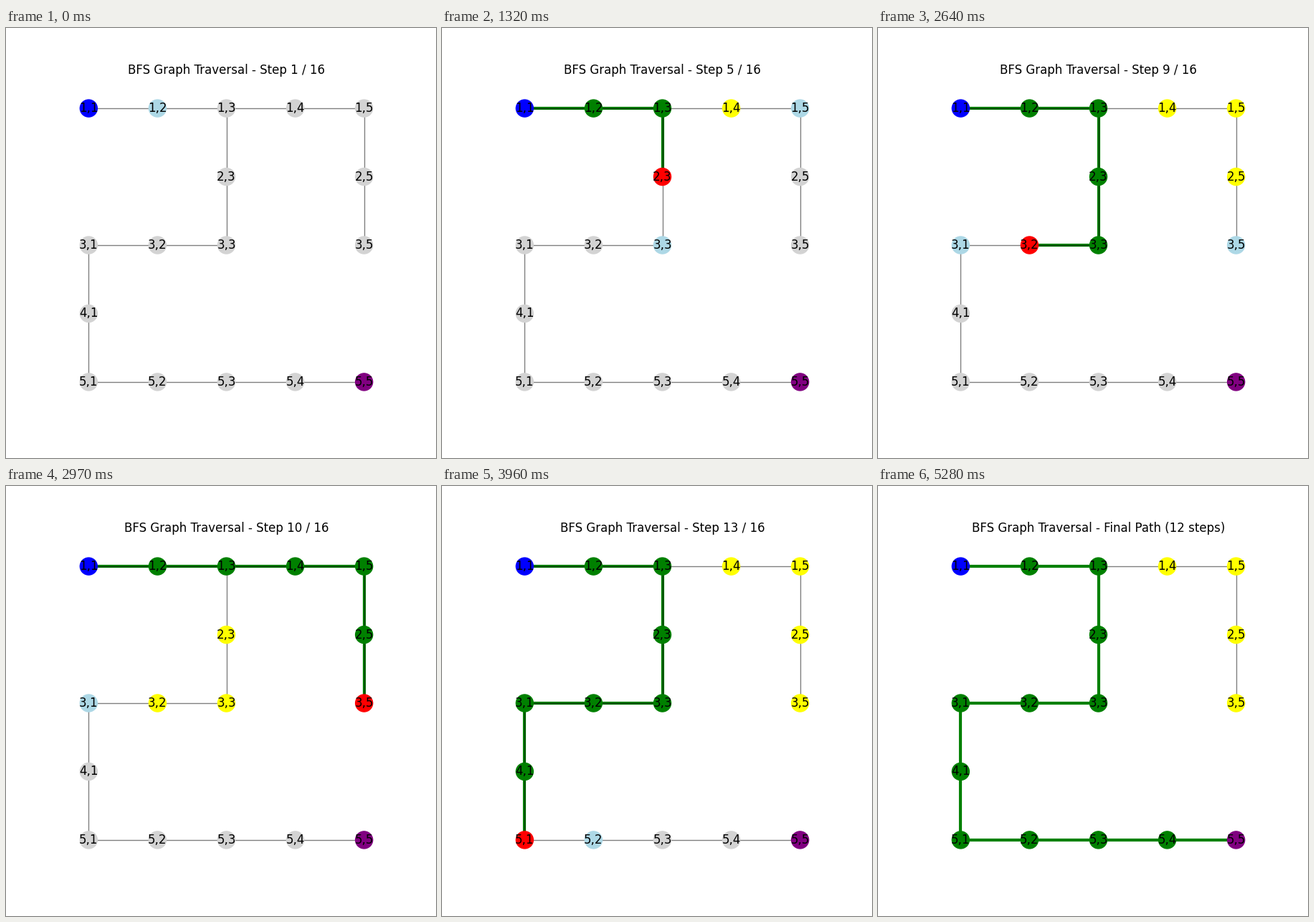
Write a matplotlib script that moves like this. It is 600x600 px and loops after 5.61 s.

```python
import matplotlib.pyplot as plt
from matplotlib.animation import FuncAnimation
from matplotlib.collections import LineCollection

MAZE = ["#####",
        "..#.#",
        "###.#",
        "#....",
        "#####"]
START, GOAL = (1, 1), (5, 5)
INTERVAL = 330

nodes = [(r, c) for r, row in enumerate(MAZE, 1)
         for c, cell in enumerate(row, 1) if cell == "#"]


def neighbours(node):
    r, c = node
    around = [(r, c - 1), (r, c + 1), (r + 1, c), (r - 1, c)]
    return [n for n in around if n in nodes]


def bfs():
    """Return the visiting order and the parent of every node."""
    parent, order = {START: None}, [START]
    for node in order:
        for n in neighbours(node):
            if n not in parent:
                parent[n] = node
                order.append(n)
    return order, parent


def path_to(node):
    path = []
    while node:
        path.append(node)
        node = parent[node]
    return path[::-1]


def xy(node):
    return node[1], 6 - node[0]


def segment(a, b):
    return [xy(a), xy(b)]


order, parent = bfs()
steps = order.index(GOAL)

fig, ax = plt.subplots(figsize=(6, 6), dpi=100)
ax.set_axis_off()
ax.set_xlim(0.58, 5.42)
ax.set_ylim(0.58, 5.42)

edges = LineCollection(
    [segment(a, b) for a in nodes for b in neighbours(a) if a < b],
    colors="black", linewidths=1, alpha=0.5, zorder=1)
trail = LineCollection([], colors="green", linewidths=3, zorder=0.9)
ax.add_collection(edges, autolim=False)
ax.add_collection(trail, autolim=False)
dots = ax.scatter(*zip(*map(xy, nodes)), s=300, c="lightgray", zorder=2)
for node in nodes:
    ax.text(*xy(node), "%d,%d" % node, size=12, ha="center", va="center")
title = ax.set_title("", fontsize=12)


def colour(node, current, path, visited, seen):
    if node == START:
        return "blue"
    if node == GOAL:
        return "purple"
    if node == current:
        return "red"
    if node in path:
        return "green"
    if node in visited:
        return "yellow"
    return "lightblue" if node in seen else "lightgray"


def update(i):
    done = i == steps
    current = order[i]
    path = path_to(current)
    visited = order[:i + 1]
    seen = {n for v in visited for n in neighbours(v)}

    dots.set_color([colour(n, current, path, visited, seen) for n in nodes])
    trail.set_segments([segment(a, b) for a, b in zip(path, path[1:])])
    trail.set_zorder(1.1 if done else 0.9)
    label = (f"Final Path ({len(path) - 1} steps)" if done
             else f"Step {i + 1} / {steps}")
    title.set_text("BFS Graph Traversal - " + label)
    return dots, trail, title


anim = FuncAnimation(fig, update, frames=steps + 1, interval=INTERVAL,
                     repeat=True, repeat_delay=0, blit=False)
plt.show()
```
